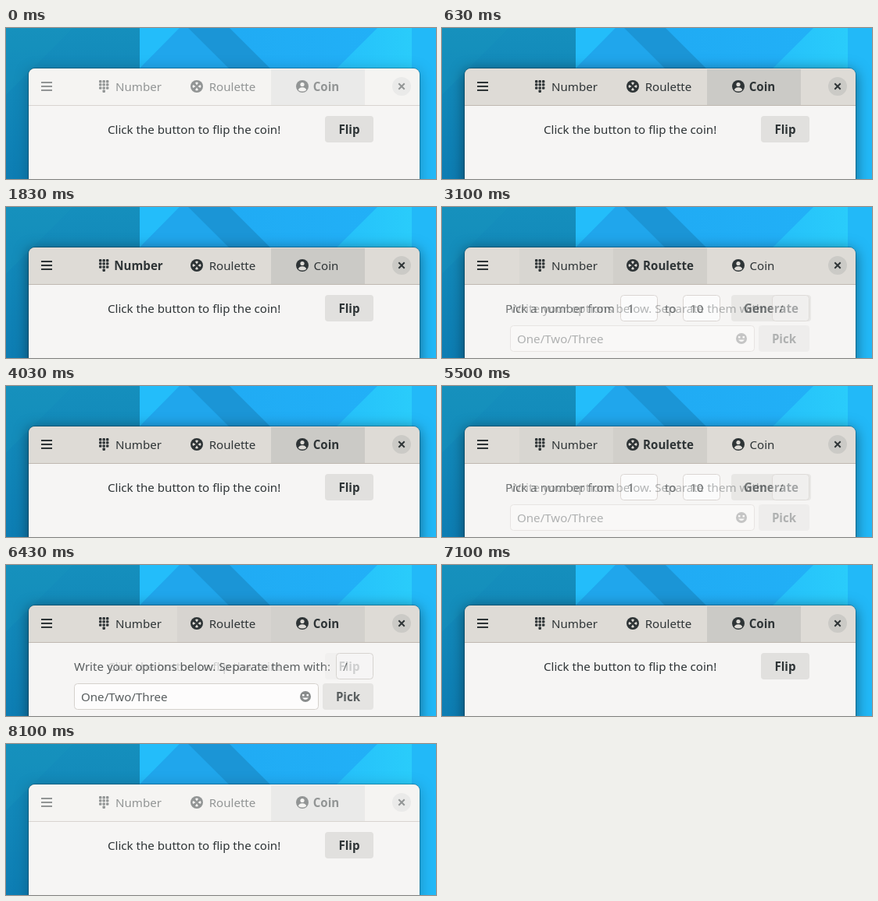
Animation of 550 by 194 pixels, one loop 8.63 s. Source, as an HTML page:

```html
<!DOCTYPE html>
<html lang="en">
<head>
<meta charset="utf-8">
<title>Tab switcher</title>
<style>
  html, body { margin: 0; width: 100%; height: 100%; overflow: hidden; }
  svg {
    --idle: 100%;
    --ink: color-mix(in srgb, #2e3436, #929595 var(--idle));
    --bar: color-mix(in srgb, #dedbd6, #f5f4f2 var(--idle));
    --checked: color-mix(in srgb, #cbcac6, #eaeae9 var(--idle));
    --line: color-mix(in srgb, #bfb8b1, #d8d4d0 var(--idle));
    display: block;
    font: 15.1px "Noto Sans", "Open Sans", sans-serif;
    fill: #2e3436;
  }
  .bold { font-weight: 600; }
  .mid { text-anchor: middle; }
  .ink { fill: var(--ink); }
  .bar { fill: var(--bar); }
  .checked { fill: var(--checked); }
  .frame { fill: #f6f5f4; filter: drop-shadow(0 3px 9px rgb(0 0 0 / calc(50% - var(--idle) * .25))); }
  .outline { fill: none; stroke: rgba(0, 0, 0, .23); }
  .entry { fill: #fff; stroke: #cdc7c2; }
  .button { fill: #e1e0de; }
</style>
</head>
<body>
<svg id="stage" width="550" height="194" viewBox="0 0 550 194">
  <defs>
    <linearGradient id="teal" x2="0" y2="1">
      <stop stop-color="#158fbd"/><stop offset="1" stop-color="#0d7db3"/>
    </linearGradient>
    <linearGradient id="sky">
      <stop stop-color="#1fa8f2"/><stop offset="1" stop-color="#22b2f8"/>
    </linearGradient>
    <linearGradient id="cyan">
      <stop stop-color="#25c0fa"/><stop offset="1" stop-color="#2bd0fb"/>
    </linearGradient>
  </defs>

  <rect width="171" height="194" fill="url(#teal)"/>
  <path d="M0 86L86 0H0Z" fill="#1a94bd" opacity=".3"/>
  <rect x="171" width="379" height="194" fill="url(#sky)"/>
  <path d="M171 0H222L171 52Z" fill="#23bdfa"/>
  <path d="M222 0L171 52H285L233 0Z" fill="#20a6ec"/>
  <path d="M233 0H286L338 52H285Z" fill="#1b95d6"/>
  <path d="M475 0L423 52V194H550V0Z" fill="url(#cyan)"/>
  <path d="M519 0H550V194H519Z" fill="#22b9f8"/>

  <rect class="frame" x="29" y="52" width="500" height="160" rx="8"/>
  <path class="bar" d="M29 99V60a8 8 0 0 1 8-8H521a8 8 0 0 1 8 8V99Z"/>
  <rect class="outline" x="28.5" y="51.5" width="501" height="160" rx="8.5"/>
  <g id="tabs"></g>
  <rect x="29" y="99" width="500" height="1" style="fill:var(--line)"/>

  <g class="ink">
    <path d="M45 69h14v2h-14zM45 74h14v2h-14zM45 79h14v2h-14z"/>
    <g id="keypad"></g>
    <circle cx="244" cy="75" r="8"/>
    <circle cx="379" cy="75" r="8"/>
  </g>
  <g class="bar">
    <g id="wheel"></g>
    <circle cx="379" cy="72.5" r="2.6"/>
    <path d="M374 80c0-5 10-5 10 0q-5 3-10 0Z"/>
  </g>
  <g id="labels" class="ink mid"></g>
  <circle class="checked" cx="506" cy="75" r="12"/>
  <path d="M503 72l6 6m0-6l-6 6" style="stroke:var(--ink);stroke-width:2;stroke-linecap:square"/>
  <g id="pages"></g>
</svg>

<script>
const LOOP = 8630;
const NUMBER = 0, ROULETTE = 1, COIN = 2;
const FOCUS_AT = 630;
const BLUR_STEPS = [[7970, .35], [8030, .75], [8100, 1]];

// When each label turns bold, and the steps of the page fade that follows.
const switches = [
  { page: COIN, at: 0, fade: [[0, 1]] },
  { page: NUMBER, at: 1830, fade: [[2230, .35], [2300, .75], [2430, 1]] },
  { page: ROULETTE, at: 2900, fade: [[3100, .35], [3230, .9], [3300, 1]] },
  { page: COIN, at: 3770, fade: [[3830, .22], [3900, .5], [3970, .8], [4030, 1]] },
  { page: NUMBER, at: 4500, fade: [[4570, .35], [4630, .75], [4700, 1]] },
  { page: ROULETTE, at: 5230, fade: [[5500, .35], [5570, .75], [5630, 1]] },
  { page: COIN, at: 6230, fade: [[6430, .22], [6500, .65], [6570, 1]] },
];

const $ = id => document.getElementById(id);
const text = (x, y, s, cls = '') => `<text x="${x}" y="${y}" class="${cls}">${s}</text>`;
const box = (cls, x, y, w, h) => `<rect class="${cls}" x="${x}" y="${y}" width="${w}" height="${h}" rx="4"/>`;
const button = (x, y, w, s) =>
  box('button', x, y, w, 34) + text(x + w / 2, y + 23, s, 'bold mid');
const entry = (x, y, w, s) =>
  box('entry', x + .5, y + .5, w - 1, 33) + text(x + 9, y + 23, s);

const smiley = `<circle cx="383" cy="169" r="7" fill="#6b6f70"/>
  <path d="M379 166h2.5v2.5h-2.5zM384.500 166h2.5v2.5h-2.5zM379 170.500h8q-4 5-8 0Z" fill="#fff"/>`;

const pageMarkup = [
  text(81, 136, 'Pick a number from') + entry(228, 113, 48, '1') + text(285, 136, 'to') +
    entry(308, 113, 48, '10') + button(370, 113, 102, 'Generate'),
  text(87, 136, 'Write your options below. Separate them with:') + entry(422, 113, 48, '/') +
    entry(87, 152, 313, 'One/Two/Three') + smiley + button(405, 152, 65, 'Pick'),
  text(130, 136, 'Click the button to flip the coin!') + button(408, 113, 62, 'Flip'),
];

$('pages').innerHTML = pageMarkup.map(m => `<g>${m}</g>`).join('');
$('tabs').innerHTML = [99, 219, 339]
  .map(x => `<rect class="checked" x="${x}" y="53" width="120" height="46"/>`).join('');
$('labels').innerHTML = text(169.5, 81, 'Number') + text(289.5, 81, 'Roulette') + text(409.5, 81, 'Coin');

for (let i = 0; i < 12; i++) {
  const col = i % 3, row = Math.floor(i / 3);
  if (row < 3 || col === 1)
    $('keypad').innerHTML += `<rect x="${119 + col * 4.5}" y="${67 + row * 4.2}" width="3.4" height="3.4" rx="1"/>`;
}
for (let i = 0; i < 4; i++)
  $('wheel').innerHTML += `<path d="M242 70.500q2-2 4 0l-2 3Z" transform="rotate(${i * 90} 244 75)"/>`;

const stepped = (steps, t) => steps.reduce((value, [at, v]) => t >= at ? v : value, 0);

function draw(t) {
  const index = switches.findLastIndex(s => t >= s.at);
  const { page, fade } = switches[index];
  const previous = index ? switches[index - 1].page : page;
  const p = stepped(fade, t);
  const tab = p && Math.min(1, .5 + p * .5);
  const share = (i, v) => i === page ? v : i === previous ? 1 - v : 0;

  for (let i = 0; i < 3; i++) {
    $('pages').children[i].style.opacity = share(i, p);
    $('tabs').children[i].style.opacity = share(i, tab);
    $('labels').children[i].classList.toggle('bold', i === page);
  }
  const idle = t < FOCUS_AT ? 1 : stepped(BLUR_STEPS, t);
  $('stage').style.setProperty('--idle', idle * 100 + '%');
}

const start = performance.now();
function tick() {
  draw((performance.now() - start) % LOOP);
  requestAnimationFrame(tick);
}
tick();
</script>
</body>
</html>
```
